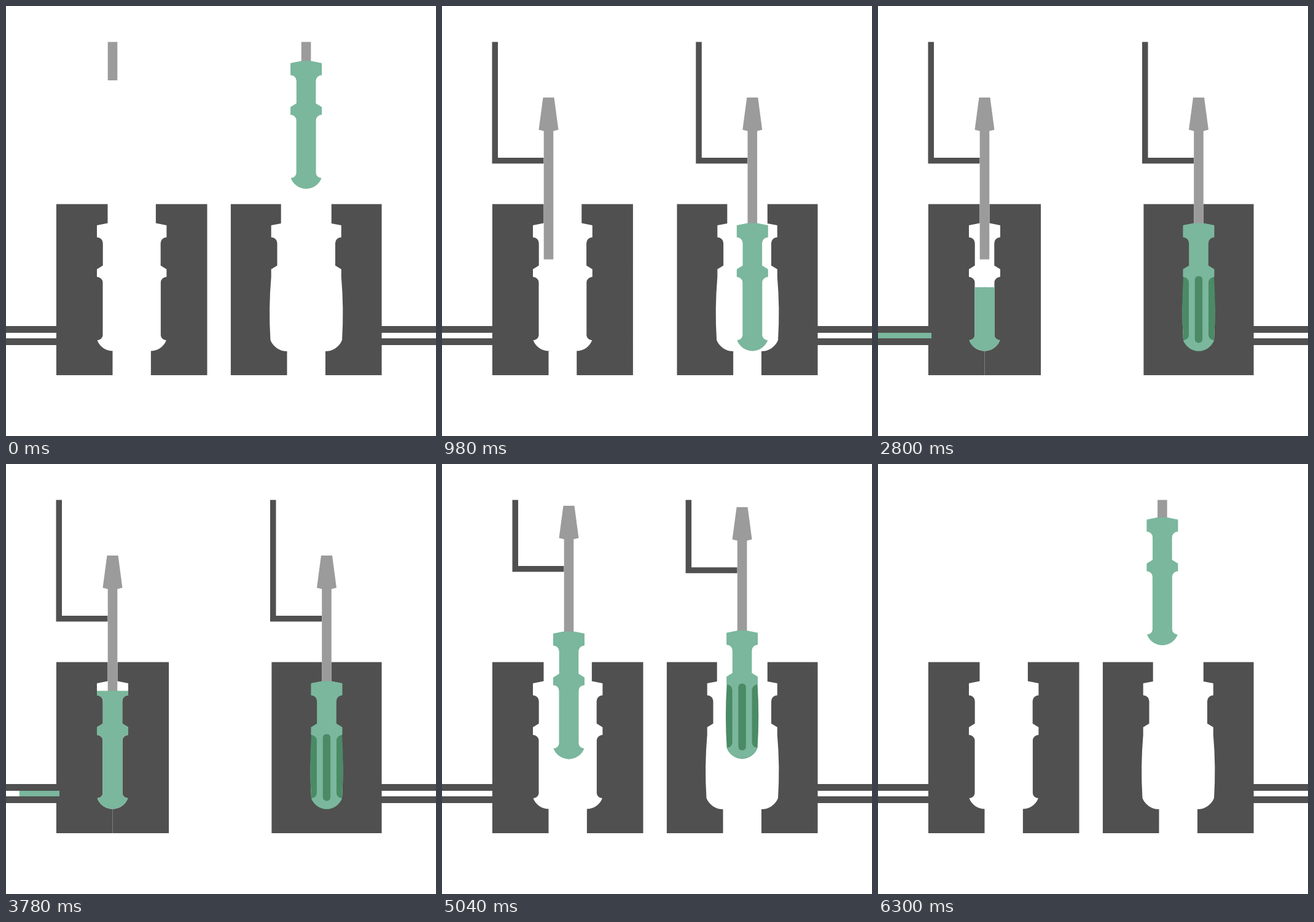
Animation, 700 px wide and 700 px high, one loop 6.44 s. Source, as an HTML page with a canvas:

```html
<!DOCTYPE html>
<html lang="en">
<head>
<meta charset="utf-8">
<title>Screwdriver moulding</title>
<style>
html, body { margin: 0; width: 100%; height: 100%; overflow: hidden; background: #fff; }
canvas { display: block; width: 700px; height: 700px; }
</style>
</head>
<body>
<canvas id="stage" width="700" height="700"></canvas>
<script>
const ctx = document.getElementById('stage').getContext('2d');
const STEP = 140, STEPS = 46;
const STEEL = '#505050', ROD = '#9b9b9b', LIGHT = '#7ab79d', DARK = '#4a8b66';

// Right halves of symmetric outlines, x measured from the axis
const collar = (wide, neck) =>
  `L${wide} 357V376.5A9.7 9.5 0 0 0 ${neck} 386V422.5L${wide} 428.5V441`;
const grip = 'A9.5 9 0 0 0 16 450V536A8.5 8.5 0 0 0 25 544A26.6 26.6 0 0 1 0 561.5';
const barrel = 'Q28.3 493 25 544';
const half = {
  handle: new Path2D(`M-1 353.5H8${collar(25.5, 15.8)}${grip}H-1Z`),
  barrel: new Path2D(`M-1 441H25${barrel}A26.3 26.3 0 0 1 0 562H-1Z`),
  mouldA: new Path2D(`M8 322.5V353.5${collar(25.5, 15.8)}${grip}V601H91.6V322.5Z`),
  mouldB: new Path2D(`M7.8 322.5V354${collar(23.8, 14)}${barrel}A29 29 0 0 1 -2 562V601H89.6V322.5Z`)
};
const shaft = new Path2D('M-9 149H9L16 201.5L7.8 203.5V412.5H-7.8V203.5L-16 201.5Z');
const arm = new Path2D('M-92 -100H-82.5V247H-8V256.5H-92Z');
const slot = new Path2D();
slot.roundRect(-6.2, 439.5, 12.4, 109, 6);

function rect(color, x, y, w, h) {
  ctx.fillStyle = color;
  ctx.fillRect(x, y, w, h);
}

function at(x, y, draw, flip = 1) {
  ctx.save();
  ctx.translate(x, y);
  ctx.scale(flip, 1);
  draw();
  ctx.restore();
}

function fill(color, path) {
  ctx.fillStyle = color;
  ctx.fill(path);
}

function both(color, path) {
  for (const side of [1, -1]) at(0, 0, () => fill(color, path), side);
}

// Shows only what lies below the rising surface
function filledTo(level, draw) {
  ctx.save();
  ctx.beginPath();
  ctx.rect(-60, level, 120, 620 - level);
  ctx.clip();
  draw();
  ctx.restore();
}

function tool(x, y, drop, drawHandle) {
  at(x, y, () => {
    at(0, drop, () => {
      fill(STEEL, arm);
      fill(ROD, shaft);
    });
    drawHandle();
  });
}

function render(k) {
  const ramp = (a, b) => Math.min(1, Math.max(0, (k - a) / (b - a)));
  const opening = ramp(30, 32.5);
  const openA = 62.4 * (1 - ramp(6, 9.76) + opening);
  const openB = 66.5 * (1 - ramp(6, 10) + opening);
  const lower = 1 - ramp(0, 6), lift = ramp(34.25, 40);
  const centre = ramp(32.25, 34.25), carry = 282 * ramp(40, 45.5);
  const levelA = 561.5 - 208 * ramp(11.8, 28.25);
  const levelB = 561.5 - 122 * ramp(11.8, 19.9);

  rect('#fff', 0, 0, 700, 700);
  for (const y of [521, 541]) {
    rect(STEEL, 0, y, 83, 11);
    rect(STEEL, 611, y, 89, 11);
  }

  at(173.5, 0, () => fill(STEEL, half.mouldA), -1);
  at(173.5 + openA, 0, () => fill(STEEL, half.mouldA));
  at(522 - openB, 0, () => fill(STEEL, half.mouldB), -1);
  at(522, 0, () => fill(STEEL, half.mouldB));

  const tailA = 87 * ramp(26.55, 28.35);
  rect(LIGHT, tailA, 532, Math.max(0, 87 * ramp(10, 11.8) - tailA), 9);
  const headB = 700 - 89 * ramp(10, 11.8), tailB = 700 - 89 * ramp(18.2, 20);
  rect(DARK, headB, 532, Math.max(0, tailB - headB), 9);

  ctx.save();
  ctx.beginPath();
  ctx.rect(0, 58.5, 700, 641.5);
  ctx.clip();
  tool(173.5 + 33 * centre + carry, -291.5 * lower - 266.5 * lift, 0, () =>
    filledTo(levelA, () => both(LIGHT, half.handle)));
  tool(488.6 + 33.4 * (ramp(6, 8) - centre) + carry, -264 * lower - 270 * lift, k > 30 ? 3.5 : 0, () => {
    filledTo(levelB, () => { if (k > 11.8) both(DARK, half.barrel); });
    both(LIGHT, half.handle);
    filledTo(levelB, () => fill(DARK, slot));
  });
  ctx.restore();
}

const start = performance.now();
function tick() {
  render(Math.floor((performance.now() - start) / STEP) % STEPS);
  requestAnimationFrame(tick);
}
tick();
</script>
</body>
</html>
```
